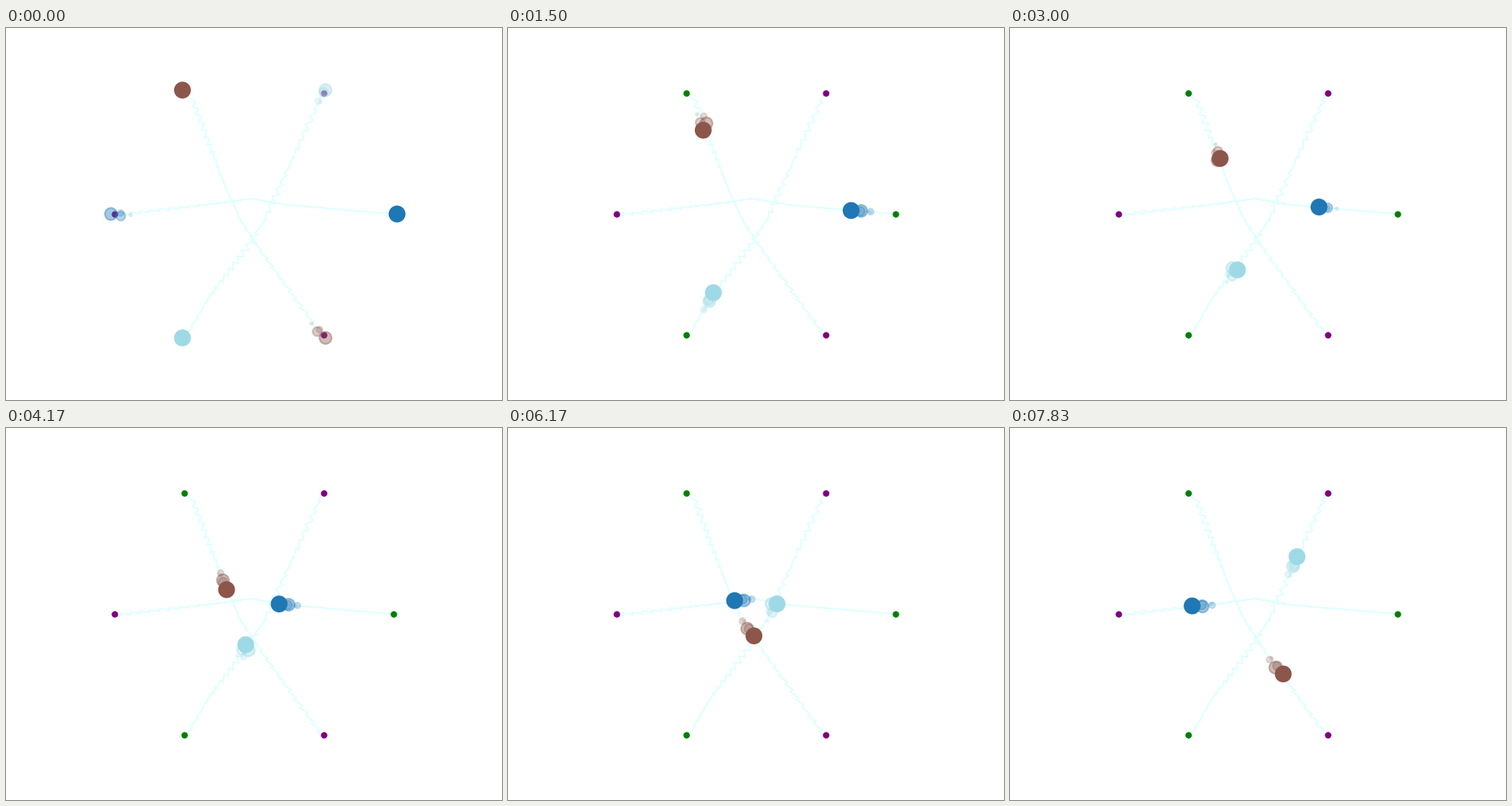
Recreate the animation shown at these times as a matplotlib script. Size 640 by 480 pixels, loop 8000 ms.

```python
import numpy as np
import matplotlib.pyplot as plt
from matplotlib.animation import FuncAnimation

W, H = 640, 480
STEPS = 64          # length of a full crossing
FRAMES = 48         # part of it that is shown
INTERVAL = 166.5    # six steps a second
ECHOES = 4
JITTER = 3.6        # sideways shake, flipped on every step

COLORS = ["#1f77b4", "#8c564b", "#9edae5"]
ANGLES = np.radians([0, 120, 240])

# Waypoints of the mean paths, and the direction of the shake in degrees.
WAY_STEPS = [0, 8, 24, 33, 41, 62]
WAYPOINTS = [
    [(501, 240), (452, 236), (361, 228), (316, 220), (276, 226), (145, 241)],
    [(238, 86), (253, 125), (281, 200), (302, 247), (327, 285), (405, 393)],
    [(235, 394), (261, 349), (310, 285), (335, 246), (354, 203), (408, 86)],
]
TURN_STEPS = [0, 24, 41, 62]
TURNS = [(0, 0, 5, 28), (5, -108, -153, -160), (150, 30, -189, -418)]


def ring(radius, angle):
    return np.array([W / 2 + radius * np.cos(angle),
                     H / 2 - radius * np.sin(angle)])


def crossing(points, turns, angle):
    step = np.arange(STEPS)
    mean = [np.interp(step, WAY_STEPS, col) for col in zip(*points)]
    phase = np.radians(np.interp(step, TURN_STEPS, turns) + 180 * step)
    shake = JITTER * np.array([np.cos(phase), np.sin(phase)])
    path = (mean + shake).T
    path[0] = ring(184.6, angle)
    path[-1] = ring(184.6, angle + np.pi)
    return path


paths = np.array([crossing(*args) for args in zip(WAYPOINTS, TURNS, ANGLES)])

fig = plt.figure(figsize=(W / 100, H / 100), dpi=100, facecolor="white")
ax = fig.add_axes([0, 0, 1, 1])
ax.set_xlim(0, W)
ax.set_ylim(H, 0)
ax.axis("off")

for path in paths:
    ax.plot(*path.T, color="lightcyan", lw=1.5, zorder=1)

for shift, color in ((0, "green"), (np.pi, "purple")):
    ax.scatter(*ring(180, ANGLES + shift), s=36, c=color,
               linewidths=0, zorder=2)


def dots(age):
    """The three agents as they were `age` steps ago: smaller and paler."""
    k = ECHOES + 1 - age
    return ax.scatter([0] * 3, [0] * 3, s=8 * k**2, c=COLORS,
                      alpha=0.1 * k if age else 1,
                      linewidths=1.5, zorder=3 + k)


layers = [dots(age) for age in range(ECHOES + 1)]


def update(n):
    for age, layer in enumerate(layers):
        layer.set_offsets(paths[:, (n - age) % STEPS])
    return layers


anim = FuncAnimation(fig, update, frames=FRAMES, interval=INTERVAL,
                     repeat=True, repeat_delay=0, blit=False)
plt.show()
```
